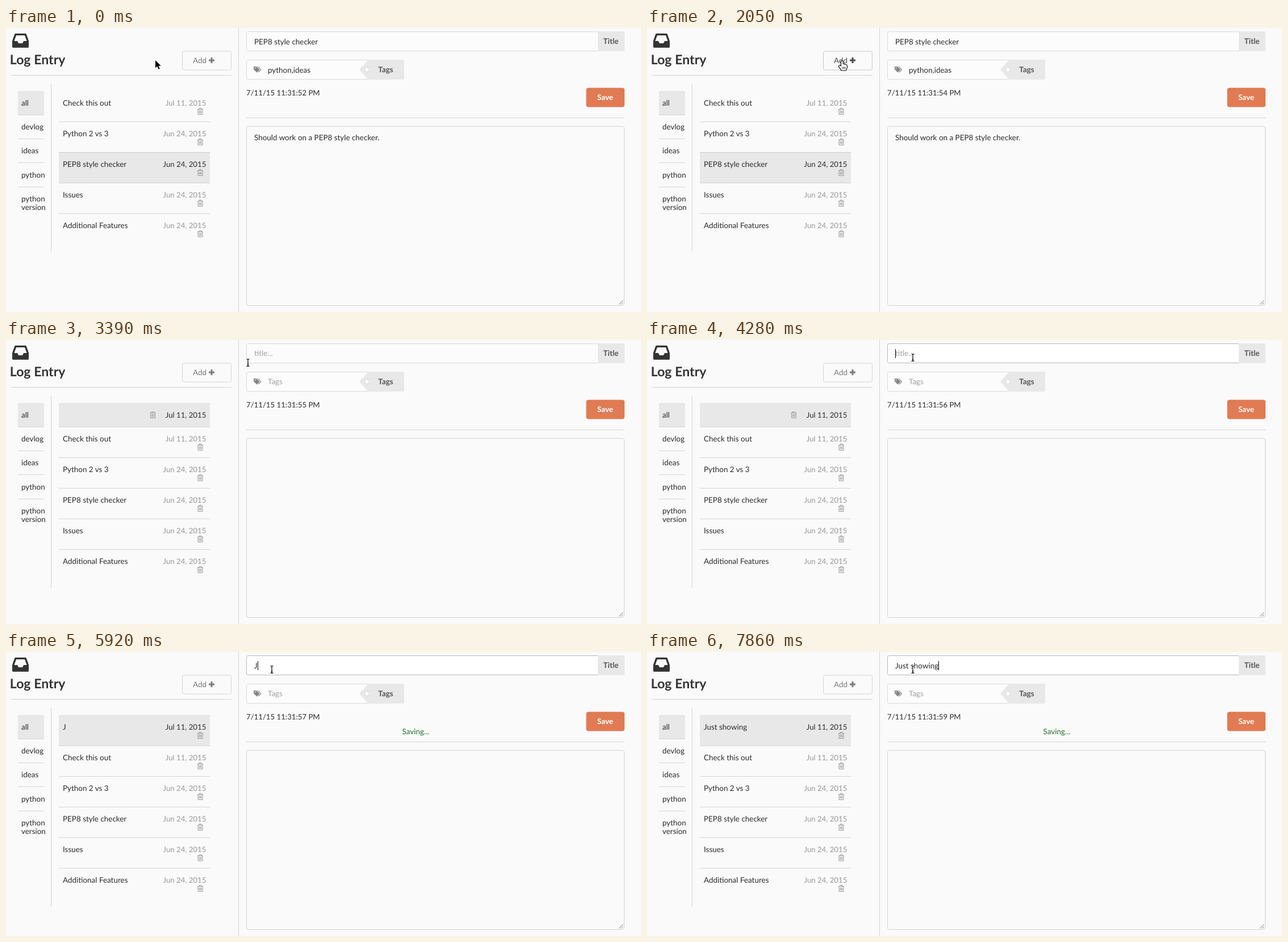
Write an HTML page with a canvas that moves like this. It is 1118 px wide and 501 px high and loops after 8 s.

```html
<!DOCTYPE html>
<html lang="en">
<head>
<meta charset="utf-8">
<title>Log Entry</title>
<style>
html, body { margin: 0; width: 100%; height: 100%; overflow: hidden; background: #fafafa; }
canvas { display: block; }
</style>
</head>
<body>
<canvas id="stage" width="1118" height="501"></canvas>
<script>
const c = document.getElementById('stage').getContext('2d');
c.textRendering = 'geometricPrecision';
const LOOP = 8000, SIZE = 13.45, DATE_SIZE = 13.2;
const DARK = '#2b2b2b', LIGHT = '#989898', LINE = '#d4d4d4', FILL = '#e8e8e8';

// Each track holds [start time, value...] steps.
const seconds = [[0, 52], [1030, 53], [2050, 54], [2940, 55], [4280, 56], [5180, 57], [6220, 58], [7270, 59]];
const typed = [[0, 0], [5920, 1], [6070, 2], [6220, 3], [6370, 4], [6520, 5], [6820, 7], [6970, 8],
  [7270, 9], [7420, 10], [7710, 11], [7860, 12]];
const pointer = [[0, arrow, 263, 57], [1030, arrow, 263, 55], [1610, arrow, 266, 54], [1760, arrow, 274, 54],
  [1900, arrow, 290, 55], [2050, hand, 345, 58], [3390, beam, 426, 40], [3540, beam, 456, 32], [3680, beam, 468, 31]];
const at = (track, t) => track.filter(s => s[0] <= t).pop();

const entries = [['Check this out', 'Jul 11, 2015'], ['Python 2 vs 3', 'Jun 24, 2015'],
  ['PEP8 style checker', 'Jun 24, 2015'], ['Issues', 'Jun 24, 2015'], ['Additional Features', 'Jun 24, 2015']];

function text(s, x, y, color = DARK, align = 'left', weight = 400, size = SIZE) {
  c.font = `${weight} ${size}px Lato, sans-serif`;
  c.textAlign = align;
  c.fillStyle = color;
  c.fillText(s, x, y);
}

function rect(x, y, w, h, color) {
  c.fillStyle = color;
  c.fillRect(x, y, w, h);
}

function box(x, y, w, h, fill, stroke, r = 3) {
  c.beginPath();
  c.roundRect(x + .5, y + .5, w - 1, h - 1, r);
  c.fillStyle = fill;
  c.fill();
  c.lineWidth = 1;
  c.strokeStyle = stroke;
  c.stroke();
}

function shape(d, x, y, fill, stroke, width = 1) {
  const p = new Path2D(d);
  c.save();
  c.translate(x, y);
  c.lineWidth = width;
  c.lineJoin = 'round';
  if (stroke) { c.strokeStyle = stroke; c.stroke(p); }
  if (fill) { c.fillStyle = fill; c.fill(p, 'evenodd'); }
  c.restore();
}

function arrow(x, y) {
  shape('M0 0V13.5L3.2 10.6L5.4 15.8L7.8 14.8L5.6 9.7H9.8Z', x, y, '#000', '#fff', 2);
}

function hand(x, y) {
  const d = 'M-3 1.5Q-3 0 -1.7 0T-.3 1.5V6Q2 5 2.6 6.6Q4.5 5.9 5 7.4Q7 7 7 9V12L5.4 14.5V16.5H-3V15L-7 10Q-7 8 -5 8.4L-3 10Z';
  shape(d, x, y, '#fff', '#000', 2.2);
  shape('M-.7 10.5V14M1.6 10.5V14M3.9 10.5V14', x, y, null, '#000', .9);
}

function beam(x, y) {
  const d = 'M-2.5 -6.5Q0 -6.5 0 -4.5Q0 -6.5 2.5 -6.5M0 -5V5M-2.5 6.5Q0 6.5 0 4.5Q0 6.5 2.5 6.5M-1.5 3H1.5';
  shape(d, x, y, null, '#fff', 2.4);
  shape(d, x, y, null, '#000', 1.2);
}

function trash(x, y) {
  shape('M-5 -3.5H5M-2 -3.5V-5.5H2V-3.5M-4 -3.5V5.5H4V-3.5M-1.8 -1.5V3.7M0 -1.5V3.7M1.8 -1.5V3.7',
    x, y, null, '#909090', .9);
}

function drawSidebar(t, title, added) {
  const hover = t >= 2050 && t < 3390;
  shape('M6 0H23Q24.5 0 25 1.4L29 13V23.5Q29 25 27.5 25H1.5Q0 25 0 23.5V13L4 1.4Q4.5 0 6 0Z' +
    'M7 3.2L3.4 13.2H9L11 17.2H18L20 13.2H25.6L22 3.2Z', 11, 9.8, '#333');
  text('Log Entry', 6.8, 64, '#333', 'left', 700, 23.1);
  rect(8, 83, 389, 1, LINE);
  box(310, 40.5, 87, 34, '#fafafa', hover ? '#c8c8c8' : LINE);
  const addColor = hover ? '#4a4a4a' : '#7b7b7b';
  text('Add', 329, 62, addColor);
  rect(357, 55.5, 10, 3, addColor);
  rect(360.5, 52, 3, 10, addColor);

  rect(21, 111, 46, 42, FILL);
  for (const y of [153, 195, 237, 280]) rect(21, y, 46, 1, LINE);
  ['all', 'devlog', 'ideas', 'python', 'python'].forEach((s, i) => text(s, 27, Math.round(136.7 + i * 42.3)));
  text('version', 27, 321);

  const rows = added ? [[title, 'Jul 11, 2015'], ...entries] : entries;
  const chosen = added ? 0 : 2;
  let top = 111;
  rows.forEach(([name, date], i) => {
    const height = name ? 54.2 : 42.2, y = Math.floor(top), end = Math.floor(top + height);
    if (i === chosen) {
      rect(93, y, 266, end - y, FILL);
      if (i) rect(93, y, 266, 1, '#ccc');
    }
    const fading = t >= 2940 && t < 3090 && i === 3;
    text(name, 100, y + 26);
    text(date, 352.3, y + 26, i === chosen ? DARK : fading ? '#555' : LIGHT, 'right', 400, DATE_SIZE);
    name ? trash(342, y + 36) : trash(258.5, y + 21);
    if (i < rows.length - 1) rect(93, end, 266, 1, LINE);
    top += height;
  });
  rect(79, 98, 1, Math.floor(top + 13) - 98, LINE);
}

function drawEditor(t, title, added) {
  const focus = t >= 4280;
  rect(409, 0, 1, 501, LINE);

  box(423, 6, 666, 35, focus ? '#fff' : '#fcfcfc', focus ? '#b5b5b5' : '#d9d9d9');
  rect(1042, 6, 47, 35, FILL);
  text('Title', 1065, 28, '#555', 'center', 700);
  const shown = added ? title : 'PEP8 style checker';
  text(shown || 'title...', 437, shown ? 29 : 28, shown ? DARK : '#a0a0a0');
  if (focus && !(t >= 4730 && t < 5180)) {
    rect(Math.round(437 + c.measureText(title).width), 16, 1, 16, '#000');
  }

  box(423, 56, 220, 35, '#fcfcfc', '#d9d9d9');
  shape('M15 0H77Q79 0 79 2V33Q79 35 77 35H15V34L0 17.5L15 1Z', 622, 56, FILL);
  c.beginPath();
  c.arc(635.5, 73.5, 4, 0, 7);
  c.fillStyle = '#fff';
  c.fill();
  c.strokeStyle = '#d2d2d2';
  c.lineWidth = 1;
  c.stroke();
  shape('M0 0H5L10.5 5.5L5.5 10.5L0 5ZM1.5 2.5A1 1 0 1 0 3.5 2.5A1 1 0 1 0 1.5 2.5Z' +
    'M6.3 0H7.8L13.5 5.5L8.5 10.5L7.5 9.8L11.8 5.5Z', 436, 68, '#858585');
  text('Tags', 668.5, 78, '#555', 'center', 700);
  text(added ? 'Tags' : 'python,ideas', 461, added ? 78 : 79, added ? '#a0a0a0' : DARK);

  text(`7/11/15 11:31:${at(seconds, t)[1]} PM`, 423, 119, DARK, 'left', 400, DATE_SIZE);
  box(1021.5, 105.5, 67.5, 34, '#e07b53', '#e07b53');
  text('Save', 1055, 127, '#fff', 'center', 700);
  if (title) text('Saving...', 697.5, 145, '#2f7d41', 'left', 500);
  rect(423, 158, 666, 1, LINE);

  box(423, 173, 666, 317, '#fafafa', '#d4d4d4');
  if (!added) text('Should work on a PEP8 style checker.', 437, 198);
  shape('M0 7L7 0M4 7L7 4', 1079.5, 480.5, null, '#777');
}

function draw(t) {
  const added = t >= 2940, title = 'Just showing'.slice(0, at(typed, t)[1]);
  rect(0, 0, 1118, 501, '#fafafa');
  drawSidebar(t, title, added);
  drawEditor(t, title, added);
  const [, cursor, x, y] = at(pointer, t);
  cursor(x, y);
}

const start = performance.now();
function tick() {
  draw((performance.now() - start) % LOOP);
  requestAnimationFrame(tick);
}
tick();
</script>
</body>
</html>
```
